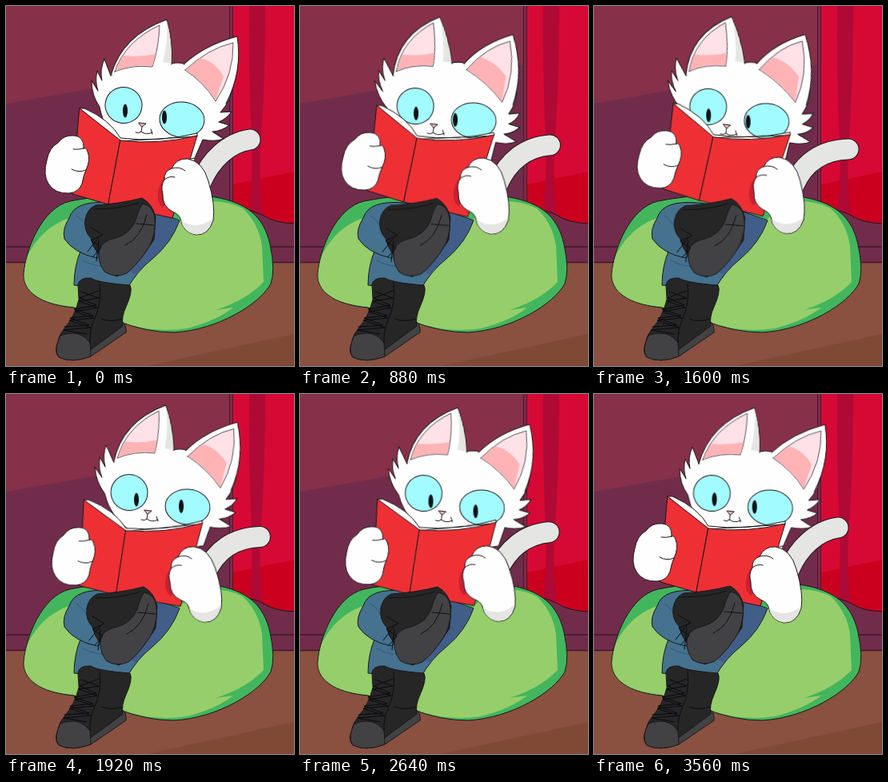
An HTML page without scripts for the animation above (3.6 s loop, 360x450 px).

```html
<!DOCTYPE html>
<html lang="en">
<head>
<meta charset="utf-8">
<title>Cat reading on a bean bag</title>
<style>
html, body { margin: 0; width: 100%; height: 100%; overflow: hidden; background: #722c4b; }
svg { display: block; width: 360px; height: 450px; }
.ink { stroke: #1c1719; stroke-width: 1; stroke-linejoin: round; stroke-linecap: round; }
.line { fill: none; }
.flat { stroke: none; }
.white { fill: #fefefe; }
.shade { fill: #e5e5e4; }
.red { fill: #ee3035; }
.jeans { fill: #44728f; }
.leather { fill: #262627; }
.sole { fill: #424244; }
.iris { fill: #a2fbff; }
.pupil { fill: #101316; }

/* Down the left page (0-44%), glance right (44-52%), down the right page, glance back. */
.move { animation: 3.6s linear infinite; }
.head { animation-name: head; transform-origin: 171px 148px; }
.face { animation-name: face; }
.pupil { animation-name: pupil; }
.reading { animation-name: reading; transform-origin: 165px 200px; }
.leg { animation-name: leg; }
.tail { animation-name: tail; animation-timing-function: ease-in-out; fill: none; stroke-linecap: round; }

@keyframes head {
  0%, 100% { transform: none; animation-timing-function: cubic-bezier(.1, .6, .4, 1); }
  44% { transform: translate(-5px, 3px) skewX(10deg) scaleY(1.05); animation-timing-function: ease-in-out; }
  52% { transform: translate(8px, -1px) skewX(4deg) scaleY(1.015); animation-timing-function: ease-in; }
  93.5% { transform: translate(9px, 2px) skewX(8deg) scaleY(.97); animation-timing-function: ease-out; }
}
@keyframes face {
  0%, 100% { transform: none; }
  44% { transform: translate(-5px, 2px); }
  52% { transform: translate(7px, -1px); }
  93.5% { transform: translate(8px, 1px); animation-timing-function: ease-out; }
}
@keyframes pupil {
  0%, 100% { transform: none; }
  44% { transform: translate(-2px, 4px); }
  52% { transform: translate(var(--glance), 2px); }
  93.5% { transform: translate(var(--glance), var(--drop)); }
}
@keyframes reading {
  0%, 98.6%, 100% { transform: none; }
  44% { transform: translate(5px, -4px) rotate(2deg); }
  52% { transform: translate(8px, 2px) rotate(-2deg); }
  93.5% { transform: translate(7px, 0) rotate(-2deg); }
}
@keyframes leg {
  0%, 98.6%, 100% { transform: none; }
  52%, 93.5% { transform: translate(2px, 1px); }
}
@keyframes tail {
  0%, 100% { d: path("M244 220C256 192 278 171 305 167"); }
  45% { d: path("M250 224C262 196 285 180 318 179"); }
}
</style>
</head>
<body>
<svg viewBox="0 0 360 450">
  <!-- room -->
  <path fill="#722c4b" d="M0 0H360V322H0Z"/>
  <path fill="#863149" d="M0 0H280V73L0 122Z"/>
  <path fill="#8a5040" d="M0 320H360V450H0Z"/>
  <path fill="#804936" d="M176 450L360 410V450Z"/>
  <path class="line" stroke="#3e1a2b" stroke-width="1.500" d="M0 301H360M0 320.500H360"/>
  <path fill="#7c2c48" d="M279 0H284V245H279Z"/>
  <path class="line" stroke="#4b1730" d="M279.500 0V245M283.500 0V245"/>
  <path fill="#d60935" d="M284 0H360V272Q335 271 322 262Q310 255 284 252Z"/>
  <path fill="#cb001f" d="M284 223L360 207V272Q335 271 322 262Q310 255 284 252Z"/>
  <path fill="#ae0a35" d="M304 0H324Q324 95 319 160Q315 215 321 262L304 256Q309 215 307 165Q303 80 304 0Z"/>
  <path class="ink line" d="M284 252Q310 255 322 262Q335 271 360 272"/>

  <!-- bean bag -->
  <path class="ink" fill="#43b65d" d="M22 336C24 305 45 252 80 244C140 232 220 233 262 239C300 246 322 262 330 298Q337 330 331 347C318 372 265 405 210 408Q176 408 140 394L85 377C52 374 22 362 22 336Z"/>
  <path fill="#96ce6b" d="M22.500 336Q24 320 28 310Q45 278 76 266L200 285L235 246Q270 240 296 253Q316 272 320 300L322 345Q300 368 262 380L284 377Q262 394 226 403Q180 410 140 393L85 376C52 373 22.500 362 22.500 336Z"/>

  <!-- jeans -->
  <g class="ink jeans">
    <path d="M94 304Q85 325 85 349L151 354Q164 331 183 316Q207 296 217 268L180 255Z"/>
    <path class="flat" fill="#405e88" d="M180 256L216 268Q206 296 183 315Q172 324 163 336L150 330Z"/>
    <path d="M130 246Q86 242 79 265Q70 279 73 291Q85 309 114 315L150 290L190 255Z"/>
    <path class="line" stroke="#315a75" d="M88 262Q100 270 103 282M96 318Q113 328 137 325"/>
  </g>

  <!-- tail -->
  <path class="move tail" stroke="#1c1719" stroke-width="27"/>
  <path class="move tail shade-line" stroke="#e5e5e4" stroke-width="25"/>

  <!-- torso and head -->
  <path class="white" d="M150 160H236L234 230H140Z"/>
  <g class="move head ink white">
    <path d="M131 87L123 66Q117 80 120 93L114 81Q111 95 115 106L107 93Q107 112 117 126Q122 155 146 172Q190 200 236 190L246 167Q262 170 272 166L258 157Q270 156 279 149L266 145Q276 141 282 132L268 133Q282 118 284 97L274 112L264 83L222 72Q215 70 207 72Q166 70 131 87Z"/>
    <path d="M131 87Q145 37 201 17Q209 44 207 73"/>
    <path class="shade flat" d="M201 18Q208 44 206.500 72L196 70Q203 45 201 18Z"/>
    <path d="M222 73Q248 49 289 38Q296 82 275 122"/>
    <g stroke-width=".7" fill="#ffe1e8">
      <path d="M136 82Q149 44 192 24Q191 53 183 76Q158 73 136 82Z"/>
      <path d="M224 80Q253 53 284 46Q285 85 262 119Q248 96 224 80Z"/>
    </g>
    <g class="flat" fill="#ffb3b5">
      <path d="M137 81Q141 70 147 62Q169 64 187 60L183 75Q158 72 137 81Z"/>
      <path d="M225 80L243 65Q262 70 272 88L262 118Q248 96 225 80Z"/>
    </g>
  </g>
  <g class="move face ink">
    <ellipse class="iris" cx="147" cy="124" rx="23" ry="22.500" transform="rotate(12 147 124)"/>
    <ellipse class="iris" cx="220" cy="142" rx="28" ry="22" transform="rotate(4 220 142)"/>
    <ellipse class="move pupil flat" style="--glance: 7px; --drop: 4px" cx="149" cy="131" rx="3" ry="8.500"/>
    <ellipse class="move pupil flat" style="--glance: 14px; --drop: 13px" cx="198" cy="139" rx="3" ry="8.500"/>
    <path fill="#f6b6bb" d="M166 146L175 147L170 151Z"/>
    <path class="line" d="M170 151L169 157M162 158Q166 160 169 157Q175 162 183 158M181 154L183 160"/>
  </g>

  <!-- book and hands -->
  <g class="move reading ink">
    <path class="white" d="M92 128L98 128Q130 142 143 165Q190 171 239 159L239 163L143 169Z"/>
    <path class="red" d="M92 128L143 168L128 248L83 235Z"/>
    <path class="red" d="M143 168Q190 174 239 162L208 265L128 248Z"/>
    <path class="white" d="M97 178Q98 163 85 162Q72 161 65 171Q54 177 51 193Q46 211 53 222Q61 235 79 234Q91 233 95 222Q97 211 100 205Q106 192 102 182Q100 176 97 178Z"/>
    <path class="line" d="M97 178Q90 180 84 179M100 205Q91 209 82 204"/>
    <path class="flat" fill="#c82030" d="M205 203L192 225Q186 243 196 252L215 230Z"/>
    <path class="white" d="M207 203Q213 190 227 191Q246 194 253 219Q262 249 259 268Q253 287 237 286Q221 283 218 266Q216 260 208 257Q195 250 196 235Q193 225 198 217Q197 207 207 203Z"/>
    <path class="line" d="M207 203Q217 200 224 206M198 217Q204 212 211 214"/>
    <path class="shade flat" d="M219 268Q238 281 258 266Q254 286 237 285.500Q222 283 219 268Z"/>
  </g>

  <!-- raised boot -->
  <g class="move leg ink">
    <path class="leather" d="M99 267Q101 254 112 249Q143 247 170 240Q183 247 187 264L185 292Q165 324 139 338Q120 332 116 311Q108 301 106 290Q97 281 99 267Z"/>
    <path class="sole" d="M171 247Q185 250 186 266Q188 279 181 297Q169 319 151 334Q136 341 123 332Q113 318 117 303Q122 293 137 290Q155 285 162 268Q166 253 171 247Z"/>
    <path class="line" stroke="#111" d="M149 299Q169 290 176 261M163 272L185 274M110 254Q143 254 166 246"/>
    <path class="line" stroke="#0b0c0e" d="M106 277L121 286L106 293L119 302L109 313M116 289L102 307M116 293L113 319"/>
  </g>

  <!-- standing boot -->
  <g class="ink">
    <path class="sole" d="M66 417L145 394Q151 399 150 408L106 438Q82 447 66 439Q59 432 66 417Z"/>
    <path class="leather" d="M90 348Q92 339 106 340Q115 346 155 349Q159 356 150 376Q144 389 146 400L104 431Q81 440 65 431Q62 416 73 403Q86 388 91 367Z"/>
    <path class="sole" d="M68 412Q92 403 105 421L106 438Q82 447 66 439Q59 430 68 412Z"/>
    <path class="line" stroke="#0d0d0f" d="M117 347Q120 372 110 393Q104 407 105 421M119 391Q131 396 145 391"/>
    <path class="line" stroke="#090a0c" d="M94 357L116 365L91 369L114 377L86 382L110 390L79 393L106 402L72 405L100 410M116 356L92 365L113 374L85 379L109 387L80 390L104 399L73 401"/>
  </g>
</svg>
</body>
</html>
```
